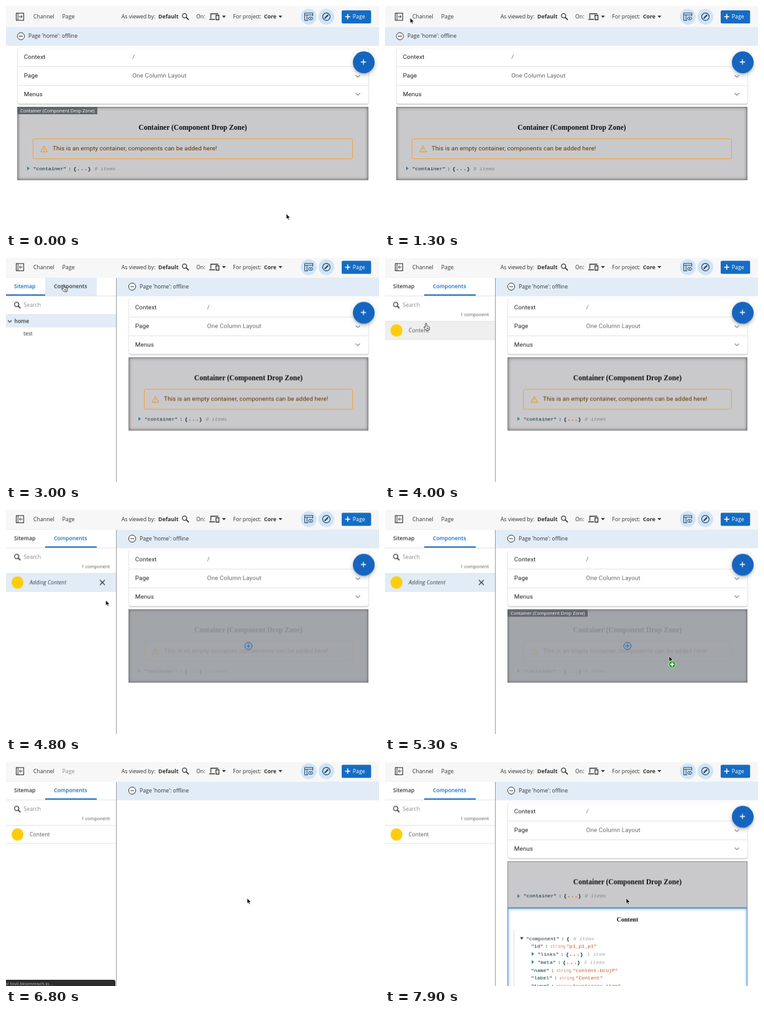
Write an HTML page that moves like this. It is 600 px wide and 360 px high and loops after 8000 ms.

```html
<!DOCTYPE html>
<html lang="en">
<head>
<meta charset="utf-8">
<title>Adding a component to a page</title>
<style>
html, body { margin: 0; width: 100%; height: 100%; overflow: hidden; background: #fff; }
#stage { position: relative; width: 600px; height: 360px; overflow: hidden; background: #fff;
  font: 8.75px "Open Sans", sans-serif; color: #333; }
#stage div, #stage svg, p { position: absolute; box-sizing: border-box; }
p { margin: 0; line-height: 20px; transform: translateY(-10px); white-space: pre; }
svg { overflow: visible; fill: none; stroke: #333; }

/* every timed part shares one clock; the name is set per part */
.a { animation: 8s step-end infinite; }
#ui { left: 0; top: 0; width: 600px; height: 364px; overflow: hidden; animation-name: lift; }
@keyframes lift { 0% { transform: none } 30%, 100% { transform: translateY(-2.5px) } }

/* toolbar */
#bar { left: 0; top: 0; width: 600px; height: 33.7px; background: #f7f7f7; }
#bar b { font-weight: 700; }
#pageMenu { animation-name: menu; }
@keyframes menu { 0% { color: #333 } 76.25% { color: #8c8c8c } 92.5%, 100% { color: #333 } }
#toRight { animation-name: toRight; }
@keyframes toRight { 0% { opacity: 1 } 26.25%, 100% { opacity: 0 } }
#toLeft { animation-name: toLeft; }
@keyframes toLeft { 0% { opacity: 0 } 26.25%, 100% { opacity: 1 } }

/* sidebar */
#side { left: 0; top: 33.7px; height: 331px; overflow: hidden; background: #fff;
  border-right: 1px solid #9b9b9b; animation-name: side; }
@keyframes side {
  0% { width: 0; opacity: 0 } 25% { width: 44px; opacity: 1 } 26.25% { width: 92px; opacity: 1 }
  27.5% { width: 139px; opacity: 1 } 28.75%, 100% { width: 178px; opacity: 1 }
}
#tabs { left: 0; top: 0; width: 100%; height: 30px; display: flex; border-bottom: 1px solid #e2e2e2; }
#tabs span { box-sizing: border-box; max-width: 48%; overflow: hidden; text-overflow: ellipsis; white-space: nowrap;
  line-height: 28px; font-size: 8.7px; font-weight: 600; }
#tab1 { width: 62.5px; padding: 0 13.5px 0 13px; animation-name: tab1; }
#tab2 { width: 83px; padding: 0 12px 0 14.5px; animation-name: tab2; }
@keyframes tab1 { 0% { color: #1565c0 } 42.5%, 100% { color: #333 } }
@keyframes tab2 {
  0% { color: #333; background: none } 36.25% { color: #333; background: #e1ecf7 }
  42.5%, 100% { color: #1565c0; background: none }
}
#ink { top: 27px; height: 2px; background: #1565c0; animation-name: ink; }
@keyframes ink {
  0% { left: 0; width: 62.5px; opacity: 0 } 30% { left: 0; width: 62.5px; opacity: 1 }
  42.5% { left: 0; width: 62.5px; opacity: 1; animation-timing-function: steps(2) }
  45%, 100% { left: 62.5px; width: 83px; opacity: 1 }
}
.line { left: 0; width: 100%; height: 1px; background: #e0e0e0; }
#searchLine { animation-name: searchLine; }
@keyframes searchLine { 0% { top: 59px } 42.5%, 100% { top: 70px } }
#tree { left: 0; top: 60px; width: 178px; height: 60px; animation-name: tree; }
@keyframes tree { 0% { opacity: 0 } 31.25% { opacity: 1 } 42.5%, 100% { opacity: 0 } }
#list { left: 0; top: 0; width: 178px; height: 120px; animation-name: list; }
@keyframes list { 0% { opacity: 0 } 43.75%, 100% { opacity: 1 } }
#row { left: 0; top: 71px; width: 178px; height: 29px; border-bottom: 1px solid #e4e4e4; animation-name: row; }
@keyframes row {
  0% { background: #fff } 48.75% { background: #efefef } 53.75% { background: #e1ecf7 } 73.75%, 100% { background: #fff }
}
#disc { left: 8.7px; top: 4.6px; width: 19.4px; height: 19.4px; border-radius: 50%; background: #fecd0a; }
#adding { animation-name: adding; }
@keyframes adding { 0% { opacity: 0 } 53.75% { opacity: 1 } 73.75%, 100% { opacity: 0 } }
#idle { animation-name: idle; }
@keyframes idle { 0% { opacity: 1 } 53.75% { opacity: 0 } 73.75%, 100% { opacity: 1 } }

/* page area */
#main { top: 33.7px; height: 331px; animation-name: main; }
@keyframes main {
  0% { left: 0; width: 600px } 25% { left: 45px; width: 578px } 26.25% { left: 93px; width: 552.5px }
  27.5% { left: 140px; width: 500px } 28.75%, 100% { left: 179px; width: 421px }
}
#head { left: -1px; right: 0; top: 0; height: 30.5px; background: #e1ecf7; }
#body { left: 0; top: -33.7px; width: 100%; height: 364px; animation-name: body; }
@keyframes body { 0% { opacity: 1 } 77.5% { opacity: 0 } 87.5%, 100% { opacity: 1 } }
#card { left: 18.5px; right: 17.5px; top: 68px; height: 89px; border-radius: 2.5px; background: #fff;
  box-shadow: 0 1px 2px rgba(0,0,0,.3), 0 0 1px rgba(0,0,0,.25);
  font: 9.85px Roboto, sans-serif; letter-spacing: .09px; color: #222; }
#card .key { left: 10.3px; }
#card .value { left: 32.75%; color: #666; }
#card .line { background: #e2e2e2; }
.down { right: 13px; }
#fab { right: 7.2px; top: 72.5px; width: 35px; height: 35px; border-radius: 50%; background: #1565c0;
  box-shadow: 0 2px 3px -1px rgba(0,0,0,.2), 0 4px 6px rgba(0,0,0,.14), 0 1px 11px rgba(0,0,0,.12); }
.zone { left: 18px; right: 17px; top: 162px; background: #c9c9cb; border: 1px solid #88888a; }
.zone h3, #part h4 { position: absolute; margin: 0; left: 0; width: 100%; text-align: center;
  font: bold 11.55px/20px "Liberation Serif", serif; color: #111; }
.zone h3 { top: 21.5px; }
#empty { height: 118px; box-shadow: inset 0 0 5px rgba(0,0,0,.5); animation-name: empty; }
@keyframes empty { 0% { opacity: 1 } 77.5%, 100% { opacity: 0 } }
#alert { left: 24px; right: 24px; top: 50px; height: 33px; border: 1px solid #f2a03d; border-radius: 2.5px;
  font: 9.85px Roboto, sans-serif; letter-spacing: .09px; color: #5f3500; }
#veil { inset: -1px; background: rgba(156,160,166,.88); box-shadow: inset 0 0 4px rgba(0,0,0,.45); animation-name: veil; }
@keyframes veil { 0% { opacity: 0 } 55% { opacity: 1 } 75%, 100% { opacity: 0 } }
#label { left: -1px; top: -1px; width: 129px; height: 12px; padding-left: 5px; background: #62666d; color: #fff;
  font-size: 7.4px; line-height: 12px; white-space: nowrap; animation-name: label; }
@keyframes label { 0% { opacity: 1 } 10% { opacity: 0 } 61.25% { opacity: 1 } 75%, 100% { opacity: 0 } }
#filled { left: 0; top: 0; width: 100%; height: 364px; animation-name: filled; }
@keyframes filled { 0% { opacity: 0 } 90%, 100% { opacity: 1 } }
#filled .zone { height: 75px; }
#part { left: 18px; right: 17px; top: 237px; height: 160px; background: #fff; border: 1px solid #3f8ae0;
  box-shadow: inset 0 0 5px rgba(50,125,220,.65); }
#part h4 { top: 8px; font-size: 10px; }

/* JSON tree */
.json { font: 8.125px/20px "Liberation Mono", "Courier New", monospace; color: #002b36; }
.json * { line-height: 1; }
.json u { text-decoration: none; font-weight: bold; margin: 0 3.5px 0 3px; }
.json s { text-decoration: none; font-weight: bold; font-size: 10px; color: #cb4b16; }
.json i { color: rgba(0,0,0,.36); margin-left: 6px; }
.json small { font-size: 6.7px; color: #dd7648; margin-right: 2px; }
.json em { font-style: normal; color: #cb4b16; }
.json.fold::before, .json.open::before { content: ""; position: absolute; left: -9.5px; top: 6.5px;
  border: 3px solid transparent; border-left: 4.2px solid #23859a; border-right: 0; }
.json.open::before { top: 7.5px; left: -10px; border: 3px solid transparent; border-top: 4.4px solid #444; border-bottom: 0; }
.l1 { left: 29px; } .l2 { left: 37px; } .l3 { left: 47.5px; }

/* browser status and pointer */
#status { left: -2px; top: 350px; width: 178px; height: 12px; border-radius: 0 3px 0 0; background: #2c2c2c; color: #aaa;
  font: 7.5px/13px "Liberation Sans", Arial, sans-serif; white-space: nowrap; animation-name: status; }
@keyframes status { 0% { opacity: 0 } 78.75% { opacity: 1 } 88.75%, 100% { opacity: 0 } }
#pointer { left: 0; top: 0; width: 1px; height: 1px; animation: move 8s steps(2) infinite; }
@keyframes move {
  0% { transform: translate(451px,334px); animation-timing-function: step-end }
  5% { transform: translate(440px,248px); animation-timing-function: step-end }
  7.5% { transform: translate(440px,248px) } 10% { transform: translate(330px,160px) }
  12.5% { transform: translate(180px,70px) } 15% { transform: translate(60px,26px) }
  17.5%, 31.25% { transform: translate(21px,12px) }
  31.25% { animation-timing-function: steps(5) }
  37.5%, 42.5% { transform: translate(93px,43px) }
  42.5% { animation-timing-function: steps(6) }
  50%, 56.25% { transform: translate(66px,105px) }
  56.25% { animation-timing-function: steps(4) }
  61.25% { transform: translate(255px,185px); animation-timing-function: steps(4) }
  66.25% { transform: translate(457px,235px); animation-timing-function: steps(4) }
  71.25%, 100% { transform: translate(388px,219px) }
}
#arrow { animation-name: arrow; }
@keyframes arrow { 0% { opacity: 1 } 17.5% { opacity: 0 } 57.5%, 100% { opacity: 1 } }
#hand { animation-name: hand; }
@keyframes hand { 0% { opacity: 0 } 17.5% { opacity: 1 } 57.5%, 100% { opacity: 0 } }
#badge { animation-name: badge; }
@keyframes badge { 0% { opacity: 0 } 61.25% { opacity: 1 } 75%, 100% { opacity: 0 } }
</style>
</head>
<body>
<div id="stage">
  <div id="ui" class="a">
    <div id="main" class="a">
      <div id="head">
        <svg width="1" height="1"><circle cx="25" cy="14.5" r="5.7" fill="#fcfdfe"/><path d="M22 14.5h6" stroke-width="1.2"/></svg>
        <p style="left:37px;top:14.6px;font-size:8.65px">Page 'home': offline</p>
      </div>
      <div id="body" class="a">
        <div id="card">
          <p class="key" style="top:14px">Context</p><p class="value" style="top:14px">/</p>
          <div class="line" style="top:29px"></div>
          <p class="key" style="top:44px">Page</p><p class="value" style="top:44px">One Column Layout</p>
          <div class="line" style="top:58.5px"></div>
          <p class="key" style="top:73.5px">Menus</p>
          <svg class="down" width="8" height="1" style="top:42.5px"><path d="M.5 0L4 3.5 7.5 0"/></svg>
          <svg class="down" width="8" height="1" style="top:72px"><path d="M.5 0L4 3.5 7.5 0"/></svg>
        </div>
        <div id="empty" class="zone a">
          <h3>Container (Component Drop Zone)</h3>
          <div id="alert">
            <svg width="1" height="1" style="left:10.5px;top:9.5px;stroke:#f2921d"><path d="M6.2.8L11.6 10.4H.8Z M6.2 4v3 M6.2 8v1.2"/></svg>
            <p style="left:31px;top:15.2px">This is an empty container, components can be added here!</p>
          </div>
          <p class="json fold" style="left:24.7px;top:98.5px">"container"<u>:</u><b>{</b><s>...</s><b>}</b><i>8 items</i></p>
          <div id="veil" class="a">
            <svg width="1" height="1" style="left:50%;top:58.5px;stroke:#1767b8"><circle r="5.8"/><path d="M-3.4 0h6.8M0-3.4v6.8"/></svg>
          </div>
          <div id="label" class="a">Container (Component Drop Zone)</div>
        </div>
        <div id="filled" class="a">
          <div class="zone">
            <h3>Container (Component Drop Zone)</h3>
            <p class="json fold" style="left:24.7px;top:55px">"container"<u>:</u><b>{</b><s>...</s><b>}</b><i>9 items</i></p>
          </div>
          <div id="part">
            <h4>Content</h4>
            <div style="left:9px;top:34px;width:1px;height:120px;background:#dcdcdc"></div>
            <p class="json open l1" style="top:48.5px">"component"<u>:</u><b>{</b><i>8 items</i></p>
            <p class="json l2" style="top:60.5px">"id"<u>:</u><small>string</small><em>"p1_p1_p1"</em></p>
            <p class="json fold l3" style="top:73.5px">"links"<u>:</u><b>{</b><s>...</s><b>}</b><i>1 item</i></p>
            <p class="json fold l3" style="top:86.5px">"meta"<u>:</u><b>{</b><s>...</s><b>}</b><i>4 items</i></p>
            <p class="json l2" style="top:99.5px">"name"<u>:</u><small>string</small><em>"content-bcujP"</em></p>
            <p class="json l2" style="top:112px">"label"<u>:</u><small>string</small><em>"Content"</em></p>
            <p class="json l2" style="top:124.5px">"type"<u>:</u><small>string</small><em>"container-item"</em></p>
          </div>
        </div>
        <div id="fab">
          <svg width="1" height="1" style="left:17.5px;top:17.5px;stroke:#fff"><path d="M-4.2 0h8.4M0-4.2v8.4" stroke-width="1.3"/></svg>
        </div>
      </div>
    </div>

    <div id="side" class="a">
      <div id="tabs"><span id="tab1" class="a">Sitemap</span><span id="tab2" class="a">Components</span></div>
      <div id="ink" class="a"></div>
      <svg width="1" height="1" style="left:18px;top:44.3px"><circle cx="-.8" cy="-.8" r="3.5" stroke-width="1.3"/><path d="M1.8 1.8L5.2 5.2" stroke-width="1.7"/></svg>
      <p style="left:28.5px;top:44.8px;color:#888">Search</p>
      <div id="searchLine" class="line a"></div>
      <div id="tree" class="a">
        <div style="left:0;top:0;width:178px;height:20px;background:#e1ecf7"></div>
        <svg width="1" height="1"><path d="M3 8.7L6 11.7 9 8.7" stroke-width="1.2"/></svg>
        <p style="left:13.5px;top:10.3px;font-size:8.5px;font-weight:600">home</p>
        <p style="left:28px;top:30.3px;font-size:8.5px">test</p>
      </div>
      <div id="list" class="a">
        <p style="right:11px;top:59px;font-size:7.35px;color:#555">1 component</p>
        <div id="row" class="a">
          <div id="disc"></div>
          <p id="idle" class="a" style="left:38px;top:14.3px;color:#555">Content</p>
          <div id="adding" class="a">
            <p style="left:38px;top:14.3px;font-style:italic;color:#444">Adding Content</p>
            <svg width="1" height="1" style="left:154.7px;top:14.3px"><path d="M-4-4L4 4M4-4L-4 4" stroke-width="1.2"/></svg>
          </div>
        </div>
      </div>
    </div>

    <div id="bar">
      <svg width="600" height="34">
        <rect x="16.5" y="11.5" width="12" height="11.5" stroke-width="1.1"/>
        <path id="toRight" class="a" d="M19.2 11.5V23M20.8 17.2h5.2M24 15l2.2 2.2L24 19.4"/>
        <path id="toLeft" class="a" d="M19.2 11.5V23M26.8 17.2h-5.4M23.6 15l-2.2 2.2 2.2 2.2"/>
        <circle cx="287.2" cy="15.6" r="3.5" stroke-width="1.3"/><path d="M289.8 18.2L294 22.4" stroke-width="1.7"/>
        <path d="M329.5 20V12.5H341.5M327 21.5H336M337.8 15H342.5V22H337.8Z" stroke-width="1.3"/>
        <path d="M347.5 15.6h6.2l-3.1 3.3zM438.3 15.6h6.2l-3.1 3.3z" fill="#333" stroke="none"/>
        <g fill="#cfe4f8" stroke="none"><circle cx="487" cy="17.2" r="12.7"/><circle cx="515.4" cy="17.2" r="12.7"/></g>
        <g stroke="#28445e">
          <path d="M486 23.2h-5.5v-12h13v5M480.5 14.3h13M484.2 14.3v8.9"/>
          <ellipse cx="490" cy="20" rx="3.6" ry="2.3"/><circle cx="490" cy="20" r=".6"/>
          <circle cx="515.4" cy="17.2" r="6" stroke-width="1.2"/><path d="M512.6 20L518.2 14.4" stroke-width="2.2"/>
        </g>
        <rect x="540" y="7" width="47.3" height="21" rx="2" fill="#156cc4" stroke="none"/>
        <path d="M545.6 17.2h8.2M549.7 13.1v8.2" stroke="#fff" stroke-width="1.6"/>
      </svg>
      <p style="left:44px;top:17px">Channel</p>
      <p id="pageMenu" class="a" style="left:90.5px;top:17px">Page</p>
      <p style="left:185.7px;top:17px">As viewed by:</p>
      <p style="left:245px;top:17px"><b>Default</b></p>
      <p style="left:306px;top:17px">On:</p>
      <p style="left:365.3px;top:17px;font-size:8.6px">For project:</p>
      <p style="left:415px;top:17px"><b>Core</b></p>
      <p style="left:557.8px;top:17px;color:#fff">Page</p>
    </div>
  </div>

  <div id="status" class="a">or tovil.bloomreach.io...</div>

  <div id="pointer">
    <svg width="1" height="1">
      <path id="arrow" class="a" d="M0 0V8.4L1.9 6.7 3.2 9.7 4.6 9.1 3.3 6.2H6Z" fill="#000" stroke="#fff" stroke-width=".6"/>
      <path id="hand" class="a" d="M-1.1 1.1Q-1.1 0 0 0T1.1 1.1V4.6L4.4 5.2Q6 5.6 5.7 7.4L5 11H.2L-3.3 7Q-3.6 5.6-2.2 5.8L-1.1 6.8ZM1.6 7v2.4M3.3 7v2.4" fill="#fff" stroke="#111" stroke-width=".8"/>
      <g id="badge" class="a"><circle cx="5" cy="13.2" r="5.7" fill="#2fa32c" stroke="#e8f3e6" stroke-width=".7"/><path d="M1.8 13.2h6.4M5 10v6.4" stroke="#fff" stroke-width="1.7"/></g>
    </svg>
  </div>
</div>
</body>
</html>
```
